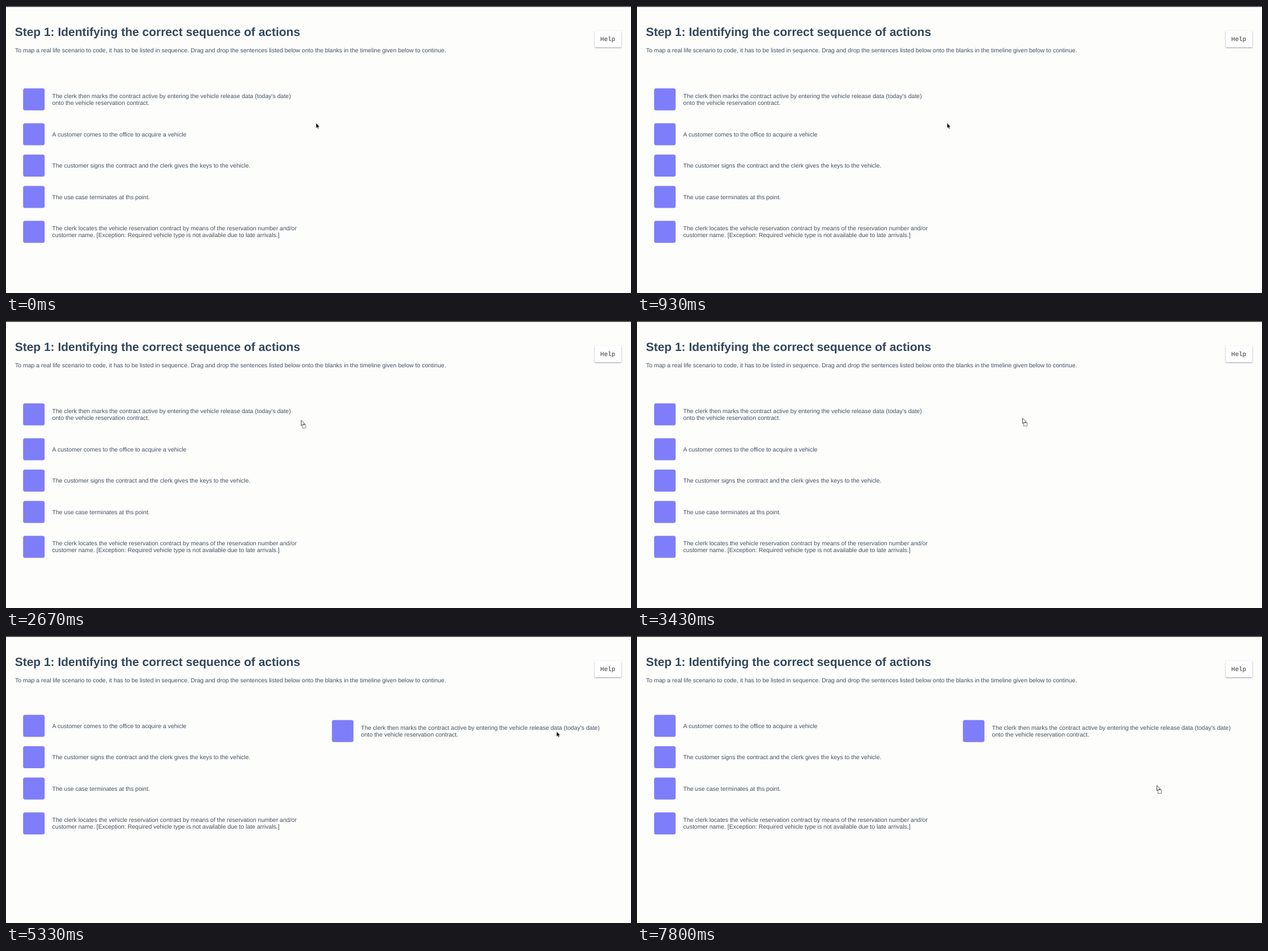
An HTML page that plays this animation: 1103 by 508 pixels, repeating every 8 s.

```html
<!DOCTYPE html>
<html lang="en">
<head>
<meta charset="utf-8">
<title>Sequence of actions</title>
<style>
  html, body { margin: 0; width: 100%; height: 100%; overflow: hidden; background: #fdfdfb; }
  svg { display: block; width: 1103px; height: 508px; }
  text {
    font: 10.5px "Liberation Sans", Arial, sans-serif;
    fill: #425161;
    text-rendering: geometricPrecision;
    white-space: pre;
  }
  .title { font-size: 20.97px; font-weight: bold; fill: #34485b; }
  .help text { font: 11px "Liberation Mono", monospace; fill: #333; }
  .help rect { fill: #fff; filter: drop-shadow(0 1px 1px rgba(50, 45, 100, .5)); }
  .row rect { fill: #7f7efa; }

  .dropped, .rest, .cursor, .arrow, .drag { animation: 8s infinite; }
  .dropped { animation-name: drop; animation-timing-function: step-end; }
  .rest { animation-name: close-gap; animation-timing-function: step-end; }
  .cursor { animation-name: travel; animation-timing-function: ease-in-out; }
  .arrow { animation-name: show-arrow; animation-timing-function: step-end; }
  .drag { animation-name: show-drag; animation-timing-function: step-end; }

  @keyframes drop {
    0% { transform: none; }
    59.4%, 100% { transform: translate(545px, 3px); }
  }
  @keyframes close-gap {
    0% { transform: none; }
    59.4%, 100% { transform: translateY(-68px); }
  }
  @keyframes show-arrow {
    0%, 56.875% { opacity: 1; }
    21.875%, 86.25%, 100% { opacity: 0; }
  }
  @keyframes show-drag {
    0%, 56.875% { opacity: 0; }
    21.875%, 86.25%, 100% { opacity: 1; }
  }
  @keyframes travel {
    0%, 12.5% { transform: translate(547px, 207px); }
    18.125%, 21.875% { transform: translate(330px, 178px); }
    23.75%, 27.5% { transform: translate(333px, 179.5px); }
    38.75%, 46.25% { transform: translate(680px, 171.5px); }
    55%, 61.25% { transform: translate(791px, 169px); }
    67.125% { transform: translate(974px, 169px); animation-timing-function: step-end; }
    70.875% { transform: translate(740px, 159px); animation-timing-function: step-end; }
    71.25% { transform: translate(507px, 164px); animation-timing-function: step-end; }
    77.5%, 86.25% { transform: translate(406px, 164px); }
    86.25% { animation-timing-function: ease-in; }
    94.125% { transform: translate(827px, 251px); animation-timing-function: ease-out; }
    97.5%, 100% { transform: translate(917px, 264px); }
  }
</style>
</head>
<body>
<svg viewBox="0 0 1103 508">
  <rect width="1103" height="508" fill="#fdfdfb"/>
  <rect width="1103" height="1.5" fill="#333"/>
  <text class="title" x="15.7" y="53">Step 1: Identifying the correct sequence of actions</text>
  <text x="16" y="82">To map a real life scenario to code, it has to be listed in sequence. Drag and drop the sentences listed below onto the blanks in the timeline given below to continue.</text>
  <g class="help">
    <rect x="1039" y="44" width="47" height="29" rx="2"/>
    <text x="1048.8" y="62">Help</text>
  </g>
  <g class="dropped"></g>
  <g class="rest"></g>
  <g class="cursor">
    <path class="arrow" d="M.3 .3V9L2.3 7.2L3.7 10.2L5 9.6L3.7 6.7H6.3Z" fill="#000" stroke="#fff" stroke-width=".3"/>
    <g class="drag" stroke="#333">
      <path d="M.5 .5V10L2.7 8L4.2 11.2L5.6 10.5L4.2 7.4H7Z" fill="#fff" stroke-width=".9"/>
      <rect x="2.5" y="8.5" width="6" height="6" fill="#fff" stroke-dasharray="1.2 .8"/>
    </g>
  </g>
</svg>
<script>
  const rows = [
    [165.2, "The clerk then marks the contract active by entering the vehicle release data (today's date)", "onto the vehicle reservation contract."],
    [227, "A customer comes to the office to acquire a vehicle"],
    [282.5, "The customer signs the contract and the clerk gives the keys to the vehicle."],
    [338, "The use case terminates at ths point."],
    [399.7, "The clerk locates the vehicle reservation contract by means of the reservation number and/or", "customer name. [Exception: Required vehicle type is not available due to late arrivals.]"]
  ];
  const LINE = 12.3;

  const rowMarkup = ([middle, ...lines]) => {
    const first = middle + 3.5 - (lines.length - 1) * LINE / 2;
    const texts = lines.map((line, i) => `<text x="81.6" y="${first + i * LINE}">${line}</text>`);
    return `<g class="row"><rect x="30.2" y="${middle - 19.5}" width="38" height="39" rx="3.5"/>${texts.join("")}</g>`;
  };

  document.querySelector(".dropped").innerHTML = rowMarkup(rows[0]);
  document.querySelector(".rest").innerHTML = rows.slice(1).map(rowMarkup).join("");
</script>
</body>
</html>
```
